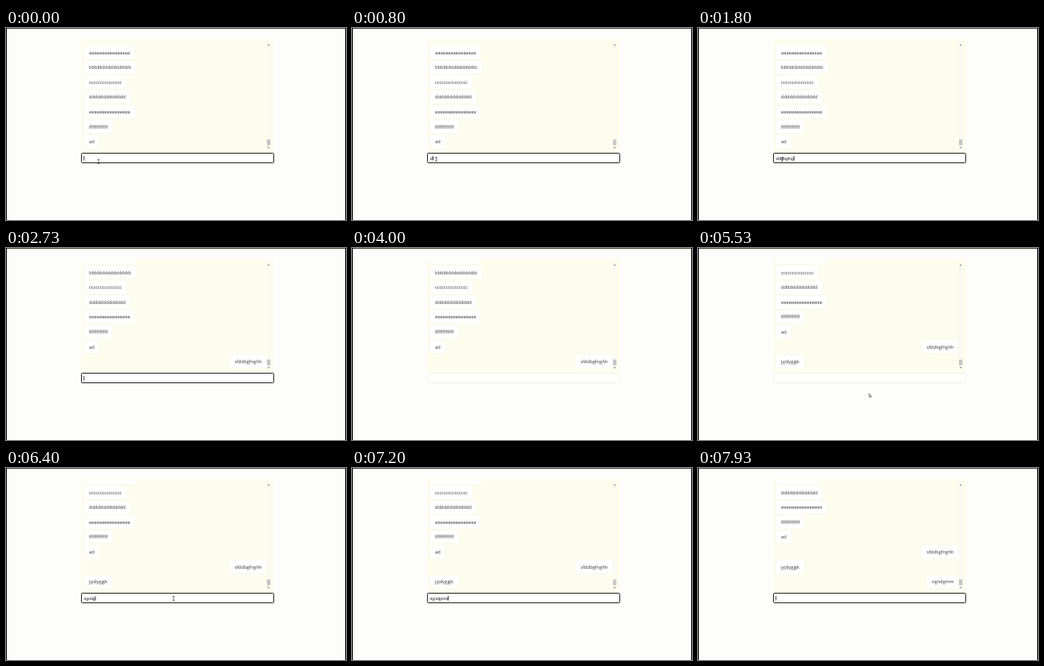
An HTML page for the animation above (8000 ms loop, 426x240 px).

```html
<!DOCTYPE html>
<html lang="en">
<head>
<meta charset="utf-8">
<title>Chat</title>
<style>
  html, body { margin: 0; width: 100%; height: 100%; overflow: hidden; background: #fdfdfb; }
  svg { display: block; width: 100vw; height: 100vh; }
  text { text-rendering: geometricPrecision; fill: #333; }
  .message { font: 5.75px "Open Sans", "Noto Sans", sans-serif; }
  .bubble { fill: #fff; stroke: #f4f4ec; stroke-width: .5; }
  #draft { font: 5.1px "Liberation Sans", Arial, sans-serif; fill: #111; }
</style>
</head>
<body>
<svg viewBox="0 0 426 240" preserveAspectRatio="none">
  <defs><clipPath id="view"><rect x="94" y="15" width="232.5" height="139"/></clipPath></defs>
  <rect width="426" height="240" fill="#fdfdfb"/>
  <rect x="94" y="14" width="242" height="142" fill="#fdfdee"/>
  <g id="log" clip-path="url(#view)"></g>
  <g>
    <rect x="326.5" y="17" width="5.5" height="135" fill="#fafaf0"/>
    <rect x="327" y="139.5" width="4.3" height="7" fill="#c4c4c4"/>
    <path d="M327.8 22l1.3-1.5 1.3 1.5zM327.8 149l1.3 1.5 1.3-1.5z" fill="#666"/>
  </g>
  <rect id="field" x="94.5" y="156.5" width="241" height="12" rx="1" fill="#fff"/>
  <text id="draft" x="97.5" y="164.5"></text>
  <rect id="caret" y="160" width=".8" height="5.5" fill="#111"/>
  <path id="beam" d="M-1.2-2.5h2.4M0-2.5v5M-1.2 2.5h2.4" fill="none" stroke="#333" stroke-width=".7"/>
  <path id="arrow" d="M-1-2.3v4.2l1-.9.7 1.5.7-.3-.7-1.5h1.3z" fill="#fff" stroke="#333" stroke-width=".6"/>
  <path d="M0 .5H426" stroke="#44483a"/>
  <path d="M.5 0V240M425.5 0V240" stroke="#000"/>
</svg>
<script>
const LOOP = 8000, ROW = 18.6, LAST_Y = 142, KEY_GAP = 150;
const $ = id => document.getElementById(id);
const repeat = (letter, count) => ({ text: letter.repeat(count), at: 0 });

const messages = [
  repeat("a", 16), repeat("b", 15), repeat("c", 15), repeat("d", 13),
  repeat("e", 16), repeat("f", 12), { text: "ad", at: 0 },
  { text: "sfddbgfnghh", at: 2500, mine: true },
  { text: "jyjdygjgk", at: 4800 },
  { text: "ngndgmm", at: 7500, mine: true }
];
const sessions = [
  { focus: 0, type: 600, send: 2500, blur: 3470, text: "sfddbgfnghh" },
  { focus: 5670, type: 5790, send: 7500, blur: LOOP, text: "ngndgmm" }
];
// Each pointer trip is a list of [time, x, y].
const trips = [
  [[0, 116, 167], [400, 105.5, 164], [2000, 105.5, 164]],
  [[5130, 222, 205], [5500, 216, 187], [5650, 210, 163], [7000, 210, 163]]
];

function make(tag, attrs, parent) {
  const node = document.createElementNS("http://www.w3.org/2000/svg", tag);
  for (const key in attrs) node.setAttribute(key, attrs[key]);
  return parent.appendChild(node);
}

function show(node, visible) {
  node.style.display = visible ? "" : "none";
}

for (const message of messages) {
  const group = message.node = make("g", {}, $("log"));
  const bubble = make("rect", { class: "bubble", y: -8.3, height: 16.6, rx: 2.5 }, group);
  const label = make("text", {
    class: "message", x: message.mine ? 320.5 : 104, y: 2.2,
    "text-anchor": message.mine ? "end" : "start"
  }, group);
  label.textContent = message.text;
  const width = label.getComputedTextLength() + 12.5;
  bubble.setAttribute("width", width);
  bubble.setAttribute("x", message.mine ? 326.5 - width : 97.5);
}

function drawLog(t) {
  const count = messages.filter(m => m.at <= t).length;
  messages.forEach((m, i) => {
    show(m.node, i < count);
    m.node.setAttribute("transform", `translate(0 ${LAST_Y - ROW * (count - 1 - i)})`);
  });
}

function drawField(t) {
  const session = sessions.find(s => t >= s.focus && t < s.blur);
  $("field").setAttribute("stroke", session ? "#222" : "#f3f3ea");
  let typed = "", changed = 0;
  if (session) {
    changed = session.focus;
    if (t >= session.send) changed = session.send;
    else if (t >= session.type) {
      const keys = Math.min(session.text.length, Math.floor((t - session.type) / KEY_GAP) + 1);
      typed = session.text.slice(0, keys);
      changed = session.type + (keys - 1) * KEY_GAP;
    }
  }
  $("draft").textContent = typed;
  $("caret").setAttribute("x", 97.4 + (typed ? $("draft").getComputedTextLength() : 0));
  show($("caret"), session && (t - changed) % 1060 < 530);
}

function drawPointer(t) {
  const trip = trips.find(p => t >= p[0][0] && t < p[p.length - 1][0]);
  show($("beam"), false);
  show($("arrow"), false);
  if (!trip) return;
  const next = trip.findIndex(p => p[0] > t);
  const [t0, x0, y0] = trip[next - 1], [t1, x1, y1] = trip[next];
  const k = (t - t0) / (t1 - t0), ease = k * k * (3 - 2 * k);
  const x = x0 + (x1 - x0) * ease, y = y0 + (y1 - y0) * ease;
  const node = $(y < 169 ? "beam" : "arrow");
  node.setAttribute("transform", `translate(${x} ${y})`);
  show(node, true);
}

const start = performance.now();
function frame(now) {
  const t = Math.max(0, now - start) % LOOP;
  drawLog(t);
  drawField(t);
  drawPointer(t);
  requestAnimationFrame(frame);
}
frame(start);
</script>
</body>
</html>
```
